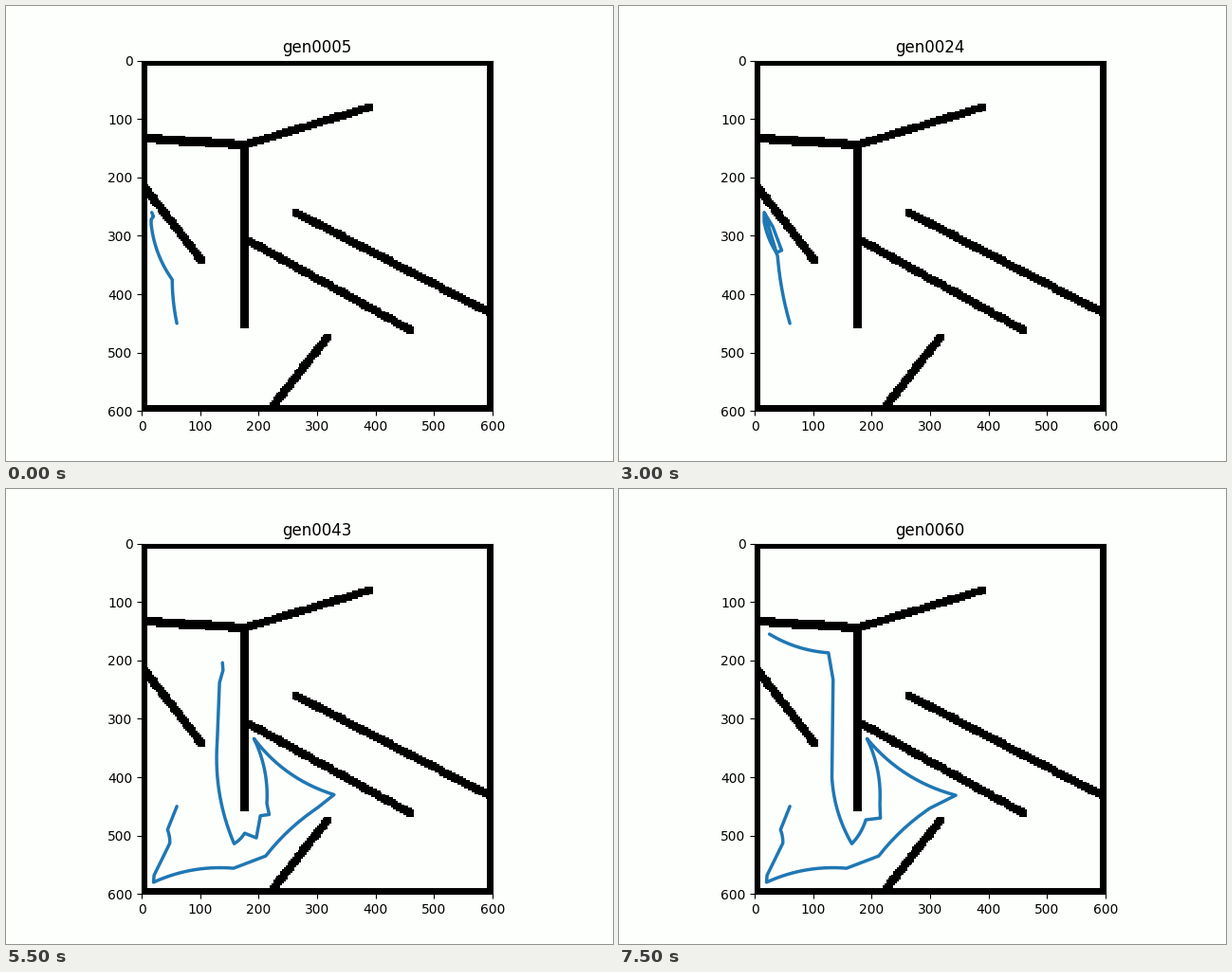
These frames come from a looping animation (640x480 px, 8000 ms). A matplotlib script:

```python
import numpy as np
import matplotlib.pyplot as plt
from matplotlib.animation import FuncAnimation

SIZE, CELL = 600, 3
PAPER = "#fdfffc"
START = (60, 450)
LABELS = [5, 8, 11, 14, 17, 21, 24, 28, 31, 34, 39, 43, 48, 52, 56, 60]


def stamp(grid, start, end, width):
    """Drag a square brush along a straight wall."""
    start, end = np.array(start), np.array(end)
    count = np.abs(end - start).max() + 1
    for x, y in np.linspace(start, end, count).round().astype(int) - width // 2:
        grid[max(y, 0):y + width, max(x, 0):x + width] = 0


def build_map():
    n = SIZE // CELL
    grid = np.full((n, n), np.nan)
    grid[:3] = grid[-3:] = 0
    grid[:, :3] = grid[:, -3:] = 0
    stamp(grid, (2, 44), (58, 48), 5)
    stamp(grid, (60, 48), (130, 27), 4)
    stamp(grid, (58, 48), (58, 150), 5)
    stamp(grid, (2, 73), (34, 114), 4)
    stamp(grid, (88, 87), (198, 144), 4)
    stamp(grid, (61, 103), (153, 154), 4)
    stamp(grid, (75, 197), (106, 158), 4)
    return grid


def arc(a, b, bend=0):
    """Quadratic curve from a to b; a positive bend bulges to the right of travel."""
    a, b = np.array(a, float), np.array(b, float)
    dx, dy = b - a
    mid = (a + b) / 2 + bend * np.array([-dy, dx])
    t = np.linspace(0, 1, 16)[:, None]
    return (1 - t) ** 2 * a + 2 * t * (1 - t) * mid + t ** 2 * b


def route(*legs):
    """Chain legs of (x, y) or (x, y, bend) from the common start."""
    parts, here = [], START
    for x, y, *bend in legs:
        parts.append(arc(here, (x, y), *bend))
        here = (x, y)
    return np.vstack(parts)


ELBOW = [(44, 490), (48, 513, -0.1), (21, 568), (20, 580)]
SWEEP = [(20, 571, -0.15), (22, 581)]
BELLY = [(157, 556, -0.13), (212, 535)]
STEP = BELLY + [(207, 517), (241, 500), (256, 480)]
WALL = [(129, 340, -0.12), (133, 238)]


def detour(tip, low, lip, tail, approach=ELBOW, floor=BELLY):
    """Along the floor, out to the tip, back into the pocket, round the wall."""
    return route(*approach, *floor, (300, 453, -0.08), tip,
                 (192, 334, -0.16), (214, 445, -0.13), *lip,
                 (low, 514, -0.12), *tail)


hook = route((52, 375, -0.05), (16, 280, -0.13), (16, 272), (20, 267), (17, 260))
loop = route((39, 335, -0.05), (37, 329), (16, 276, -0.1), (16, 260),
             (31, 285), (46, 325), (37, 329), (17, 262))
spiky = detour((315, 432), 171,
               [(220, 458), (207, 463), (205, 488), (188, 489)],
               [(154, 488), (144, 492), (125, 491), (139, 400), (137, 370),
                (131, 350), (134, 237)], floor=STEP)
smooth = detour((319, 435), 170, [(221, 456), (215, 477), (191, 471)],
                WALL + [(134, 230)], floor=STEP)
climb = detour((329, 430), 158,
               [(218, 464), (203, 466), (196, 504), (176, 496)],
               WALL + [(139, 217), (138, 204)])
corner = detour((316, 440), 158, [(217, 470), (184, 473)],
                [(127, 385, -0.08), (127, 240), (157, 163, -0.12),
                 (16, 155, -0.33), (35, 175)],
                approach=SWEEP, floor=[(164, 549, -0.11), (181, 546), (257, 496)])
direct = detour((344, 431), 166, [(215, 470), (190, 473)],
                [(132, 400, -0.12), (134, 233), (126, 187), (25, 155, -0.12)])

ROUTES = ([hook] * 3 + [loop] * 4 + [spiky] + [smooth] * 3
          + [climb] + [corner] * 2 + [direct] * 2)

fig, ax = plt.subplots(figsize=(6.4, 4.8), dpi=100, facecolor=PAPER)
ax.set_facecolor(PAPER)
ax.imshow(build_map(), cmap="gray", vmin=0, vmax=1, interpolation="nearest",
          extent=(0, SIZE, SIZE, 0))
trail, = ax.plot([], [], color="tab:blue", lw=2.5,
                 solid_joinstyle="round", solid_capstyle="round")
ax.set_xlim(0, SIZE)
ax.set_ylim(SIZE, 0)
title = ax.set_title("gen0005")


def update(i):
    trail.set_data(*ROUTES[i].T)
    title.set_text(f"gen{LABELS[i]:04d}")
    return trail, title


anim = FuncAnimation(fig, update, frames=len(LABELS), interval=500,
                     repeat=True, repeat_delay=0, blit=False)
plt.show()
```
